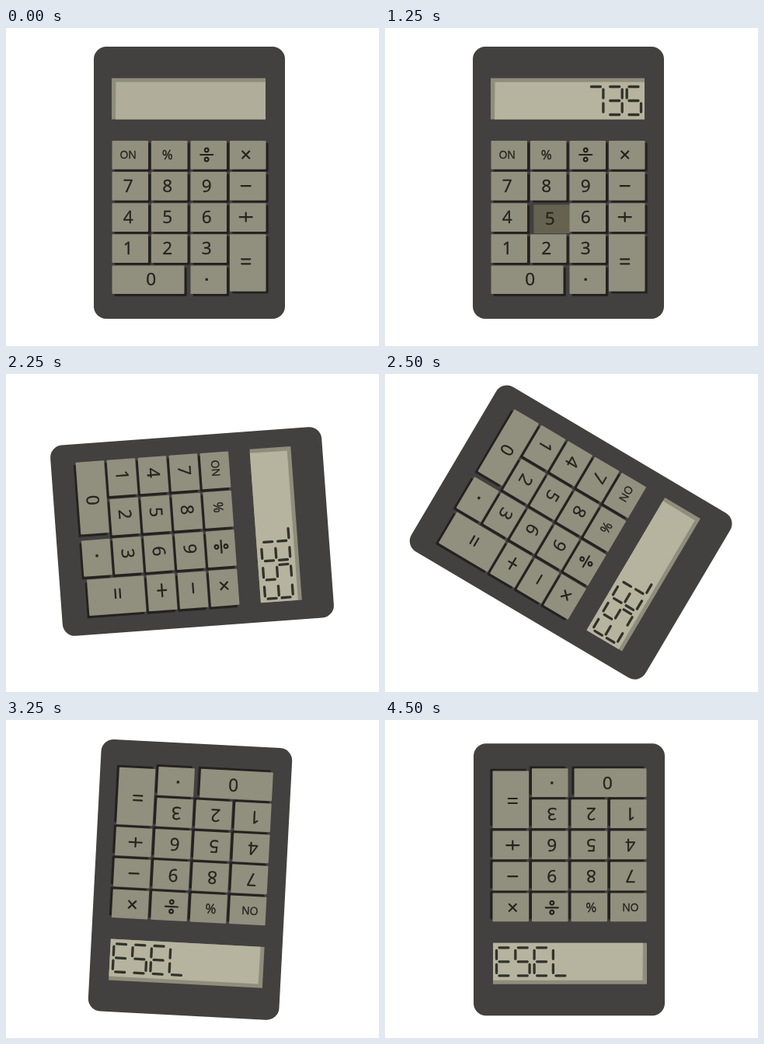
Write an HTML page that moves like this. It is 480 by 409 pixels and loops after 4750 ms.

```html
<!DOCTYPE html>
<html lang="en">
<head>
<meta charset="utf-8">
<title>Calculator</title>
<style>
  html, body { margin: 0; width: 100%; height: 100%; overflow: hidden; background: #fff; }
  svg { display: block; width: 100%; height: 100%; }
  text { font-family: "Open Sans", "Noto Sans", sans-serif; text-anchor: middle; fill: #24231e; stroke: #24231e; stroke-width: .35; }
  .ink { fill: none; stroke: #24231e; stroke-width: 2.2; stroke-linecap: round; }
  .seg { fill: none; stroke: #33322a; stroke-width: 3.3; stroke-linecap: round; }
</style>
</head>
<body>
<svg viewBox="0 0 480 409" xmlns="http://www.w3.org/2000/svg">
  <g id="calc">
    <rect x="113" y="24" width="246" height="350" rx="16" fill="#424140"/>
    <path d="M136 64.5H334V117.5H136Z" fill="#8f8d7b"/>
    <path id="screen" d="M141.5 69.5H334V117.5H141Z"/>
    <g id="digits"></g>
    <g id="keys"></g>
  </g>
</svg>
<script>
const STEP = 250, STEPS = 19;
const PIVOT = { x: 235.5, y: 199 };
const KEY = '#918f7d', PRESSED = '#656250', SHADOW = '#23221f';

const $ = id => document.getElementById(id);

function add(parent, tag, attrs) {
  const el = document.createElementNS('http://www.w3.org/2000/svg', tag);
  for (const k in attrs) el.setAttribute(k, attrs[k]);
  parent.appendChild(el);
  return el;
}

// Keypad: one string per row, '_' is covered by a larger key
const ROWS = ['O%÷×', '789−', '456+', '123=', '0_._'];
const SIGNS = {
  '÷': 'M-8 0H8M-2.4 -6a2.4 2.4 0 1 0 4.8 0a2.4 2.4 0 1 0 -4.8 0M-2.4 6a2.4 2.4 0 1 0 4.8 0a2.4 2.4 0 1 0 -4.8 0',
  '×': 'M-4.5 -4.5L4.5 4.5M4.5 -4.5L-4.5 4.5',
  '−': 'M-6 0H6',
  '+': 'M-8 0H8M0 -5.5V5.5',
  '=': 'M-5.5 -3H5.5M-5.5 3H5.5',
  '.': 'M-.5 -.5H.5V.5H-.5Z'
};

function addLabel(parent, name, x, y) {
  if (SIGNS[name]) {
    add(parent, 'path', { class: 'ink', d: SIGNS[name], transform: `translate(${x} ${y})` });
    return;
  }
  const size = { O: 14, '%': 17 }[name] || 22.5;
  const text = add(parent, 'text', { x, y: y + size * .357, 'font-size': size });
  text.textContent = name === 'O' ? 'ON' : name;
}

function addKey(name, col, row) {
  const cols = name === '0' ? 2 : 1, rows = name === '=' ? 2 : 1;
  const x = 136.5 + 50.5 * col, y = 145 + 40.1 * row;
  const box = { width: 46.5 * cols, height: 36.7 * rows, rx: 1 };
  const shadow = add($('keys'), 'rect', { ...box, x: x + 3.2, y: y + 2.8, fill: SHADOW });
  const cap = add($('keys'), 'g', {});
  const face = add(cap, 'rect', { ...box, x, y });
  addLabel(cap, name, x + 20.7 + 29.5 * (cols - 1), y + 18 + 17 * (rows - 1));
  return { name, shadow, cap, face };
}

const keys = ROWS.flatMap((line, row) =>
  [...line].flatMap((name, col) => name === '_' ? [] : addKey(name, col, row)));

// Seven-segment display: a, g, d are bars from the top; f, b, e, c are posts
const SHAPES = { 7: 'abc', 3: 'abgcd', 5: 'afgcd' };
const ENTRY = '7353', FIRST = 3, PITCH = 24.3, HALF = 18;

function segment(id) {
  const bar = 'agd'.indexOf(id), post = 'fbec'.indexOf(id);
  if (bar >= 0) return `M3.5 ${75.5 + HALF * bar}h12`;
  return `M${.7 + 18.3 * (post % 2)} ${79 + HALF * (post >> 1)}v11`;
}

const slots = [...ENTRY].map(n =>
  add($('digits'), 'path', { class: 'seg', d: [...SHAPES[n]].map(segment).join('') }));

// Upright while typing, then three turning steps, a rattle upside down, and rest
function angleAt(step) {
  if (step < 8) return 0;
  if (step < 11) return 51 + 34.8 * (step - 8);
  if (step < 12 || step > 15) return 180;
  return step % 2 ? 183 : 177;
}

function draw(step) {
  const angle = angleAt(step), turn = Math.min(1, angle / 180);
  const x = PIVOT.x + 2 * turn + 3 * Math.sin(Math.PI * turn);
  const y = PIVOT.y + 6.3 * turn;
  $('calc').setAttribute('transform',
    `translate(${x} ${y}) rotate(${angle}) translate(${-PIVOT.x} ${-PIVOT.y})`);

  const typed = Math.max(0, Math.min(ENTRY.length, step - FIRST + 1));
  $('screen').setAttribute('fill', typed ? '#b6b39f' : '#b0ae9b');
  slots.forEach((slot, i) => {
    slot.style.display = i < typed ? '' : 'none';
    slot.setAttribute('transform', `translate(${310.5 - PITCH * (typed - 1 - i)} 0)`);
  });

  const active = ENTRY[step - FIRST];
  keys.forEach(({ name, shadow, cap, face }) => {
    const down = name === active;
    shadow.style.display = down ? 'none' : '';
    face.setAttribute('fill', down ? PRESSED : KEY);
    cap.setAttribute('transform', down ? 'translate(4.5 2)' : '');
  });
}

let shown = -1;
function tick() {
  const step = Math.floor(performance.now() / STEP) % STEPS;
  if (step !== shown) draw(shown = step);
  requestAnimationFrame(tick);
}
tick();
</script>
</body>
</html>
```
